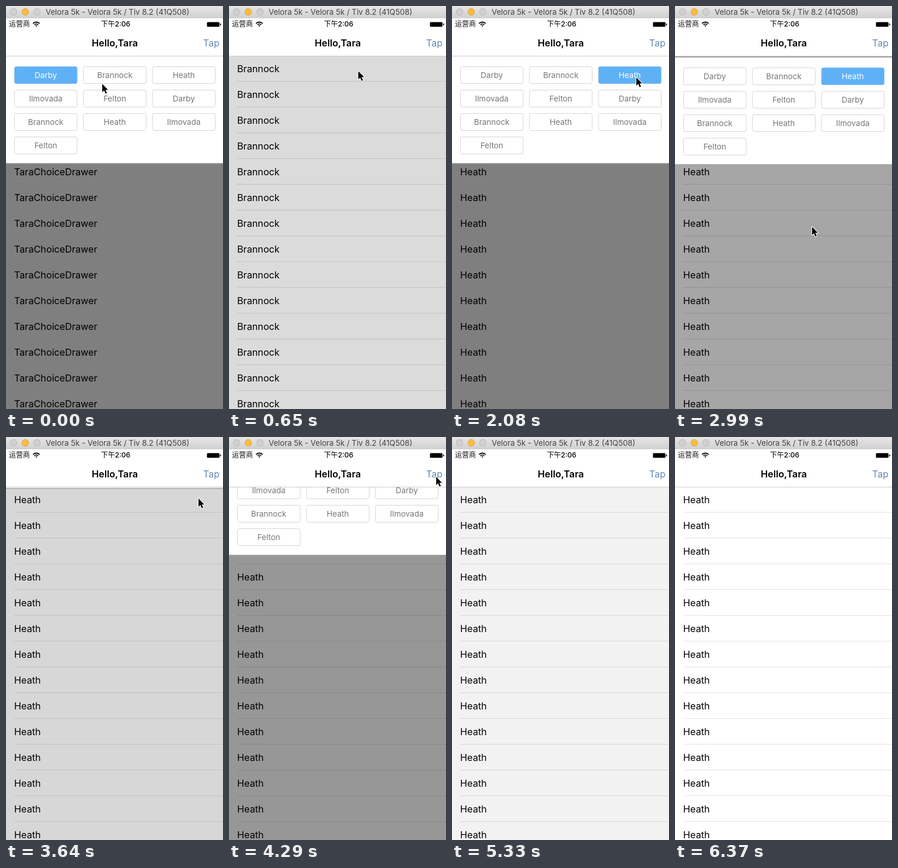
Write an HTML page with a canvas that moves like this. It is 372 px wide and 688 px high and loops after 6.63 s.

```html
<!DOCTYPE html>
<html lang="en">
<head>
<meta charset="utf-8">
<title>Dropdown selection</title>
<style>
html, body { margin: 0; width: 100%; height: 100%; overflow: hidden; background: #fff; }
canvas { display: block; width: 372px; height: 688px; }
</style>
</head>
<body>
<canvas id="stage"></canvas>
<script>
const W = 372, H = 688, LOOP = 6630, TICK = 130;
const NAV_BOTTOM = 86, PANEL_H = 184;
const SANS = 'Inter, "Noto Sans CJK SC", "Noto Sans CJK", sans-serif';
const CHIPS = ['Darby', 'Brannock', 'Heath', 'Ilmovada', 'Felton'];

// The panel starts open; each entry is [time, opens].
const TOGGLES = [[-2000, true], [390, false], [1380, true], [2120, false], [2690, true],
  [3390, false], [3800, true], [4180, false], [4564, true], [5010, false]];
const TAPS = [1370, 2690, 3800, 4180, 4564, 5000];
const PICKS = [
  { at: 0, chip: 0, label: 'TaraChoiceDrawer' },
  { at: 325, chip: 1, label: CHIPS[1] },
  { at: 2000, chip: 2, label: CHIPS[2] }
];
const POINTER = [[0, 165, 133], [260, 188, 122], [520, 200, 118], [1000, 320, 80],
  [1250, 346, 64], [1370, 343, 66], [1430, 323, 96], [1800, 312, 118], [2080, 316, 122],
  [2400, 345, 70], [2690, 347, 66], [2990, 235, 377], [3390, 235, 380], [3640, 330, 105],
  [3800, 352, 68], [4940, 360, 68], [5100, 360, 68], [5460, 392, 60]];

const canvas = document.getElementById('stage');
const ctx = canvas.getContext('2d');
const ratio = window.devicePixelRatio || 1;
canvas.width = W * ratio;
canvas.height = H * ratio;
ctx.scale(ratio, ratio);

const clamp = x => Math.max(0, Math.min(1, x));
const smooth = x => { x = clamp(x); return x * x * (3 - 2 * x); };
const latest = (list, test) => list.filter(test).pop();

// Step response of a lightly underdamped spring.
function spring(s) {
  const decay = 17, freq = 12.5;
  return 1 - Math.exp(-decay * s) * (Math.cos(freq * s) + decay / freq * Math.sin(freq * s));
}

function panelState(t) {
  const [start, opens] = latest(TOGGLES, e => e[0] <= t);
  const age = t - start;
  return opens
    ? { shown: spring(age / 1000), dim: 0.5 * smooth((age - 50) / 395) }
    : { shown: 1 - smooth(age / 270), dim: 0.5 * (1 - smooth(age / 400)) };
}

function pointerAt(t) {
  const next = POINTER.findIndex(p => p[0] > t);
  if (next < 0) return POINTER[POINTER.length - 1].slice(1);
  const a = POINTER[next - 1], b = POINTER[next];
  const k = smooth((t - a[0]) / (b[0] - a[0]));
  return [a[1] + (b[1] - a[1]) * k, a[2] + (b[2] - a[2]) * k];
}

function rect(x, y, w, h, color) {
  ctx.fillStyle = color;
  ctx.fillRect(x, y, w, h);
}

function text(str, x, middle, size, color, align = 'left', weight = 400) {
  ctx.font = `${weight} ${size}px ${SANS}`;
  ctx.textAlign = align;
  ctx.fillStyle = color;
  ctx.fillText(str, x, middle + size * 0.36);
}

function disc(x, y, r, fill, edge) {
  ctx.beginPath();
  ctx.arc(x, y, r, 0, Math.PI * 2);
  ctx.fillStyle = fill;
  ctx.fill();
  ctx.strokeStyle = edge;
  ctx.lineWidth = 1;
  ctx.stroke();
}

function drawRows(label, dim) {
  for (let y = 107; y < H + 10; y += 44) {
    text(label, 14, y, 16.2, '#000');
    if (dim < 0.49) rect(14, y + 21, W - 14, 1, '#e3e3e5');
  }
  rect(0, NAV_BOTTOM, W, H, `rgba(0,0,0,${dim})`);
}

function drawPanel(shown, selected) {
  if (shown < 0.005) return;
  ctx.save();
  ctx.translate(0, NAV_BOTTOM - Math.round(PANEL_H * (1 - shown)));
  rect(0, 0, W, PANEL_H - 2, '#fff');
  rect(0, PANEL_H - 2, W, 1.5, '#a4a7a8');
  for (let i = 0; i < 10; i++) {
    const x = 14.5 + (i % 3) * 118.3, y = 17.5 + Math.floor(i / 3) * 40;
    const on = i === selected;
    ctx.beginPath();
    ctx.roundRect(x, y, 107.5, 29, 3);
    ctx.fillStyle = on ? '#5fb1f6' : '#fff';
    ctx.fill();
    ctx.strokeStyle = on ? '#8fc2ec' : '#d6d6d6';
    ctx.lineWidth = 1;
    ctx.stroke();
    text(CHIPS[i % 5], x + 53.7, y + 14.5, 13.5, on ? '#fff' : '#777', 'center');
  }
  ctx.restore();
}

function drawStatusBar() {
  text('运营商', 5, 31, 12, '#111');
  text('下午2:06', 188, 31, 12, '#000', 'center', 500);
  ctx.strokeStyle = '#000';
  ctx.lineWidth = 1.8;
  for (const r of [1.5, 4.7, 8]) {
    ctx.beginPath();
    ctx.arc(52, 35.5, r, -Math.PI * 0.75, -Math.PI * 0.25);
    ctx.stroke();
  }
  ctx.fillStyle = '#000';
  ctx.beginPath();
  ctx.roundRect(344.5, 27.5, 21.5, 8, 1.5);
  ctx.fill();
  ctx.fillRect(367, 30, 1.5, 3);
}

function drawChrome(pressed) {
  rect(0, 0, W, NAV_BOTTOM, '#fff');
  const bar = ctx.createLinearGradient(0, 0, 0, 21);
  bar.addColorStop(0, '#e6e6e6');
  bar.addColorStop(1, '#d0d0d0');
  rect(0, 0, W, 21, bar);
  disc(13, 10, 5.7, '#d0d0d0', '#b9b9b9');
  disc(33, 10, 5.7, '#fdbd3e', '#e0a436');
  disc(53, 10, 5.7, '#d0d0d0', '#b9b9b9');
  text('Velora 5k - Velora 5k / Tiv 8.2 (41Q508)', 68, 10.5, 13.2, '#444');
  drawStatusBar();
  text('Hello,Tara', 186.5, 63, 16.2, '#000', 'center', 600);
  text('Tap', 366, 63.5, 16, pressed ? '#dadddf' : '#6289b0', 'right');
  rect(0, 85, W, 1, '#cccccc');
}

function drawPointer([x, y]) {
  ctx.save();
  ctx.translate(x, y);
  ctx.beginPath();
  [[0, 0], [0, 14], [3.2, 11], [5.6, 16.5], [8, 15.5], [5.6, 10.2], [10, 10.2]]
    .forEach(p => ctx.lineTo(...p));
  ctx.closePath();
  ctx.lineJoin = 'round';
  ctx.lineWidth = 2;
  ctx.strokeStyle = '#fff';
  ctx.stroke();
  ctx.fillStyle = '#000';
  ctx.fill();
  ctx.restore();
}

function draw(t) {
  const { shown, dim } = panelState(t);
  const pick = latest(PICKS, p => p.at <= t);
  rect(0, 0, W, H, '#fff');
  drawRows(pick.label, dim);
  drawPanel(shown, pick.chip);
  drawChrome(TAPS.some(tap => t >= tap - 70 && t <= tap + 90));
  drawPointer(pointerAt(t));
}

const began = performance.now();
function loop() {
  const t = (performance.now() - began) % LOOP;
  draw(Math.floor(t / TICK) * TICK);
  requestAnimationFrame(loop);
}
loop();
</script>
</body>
</html>
```
